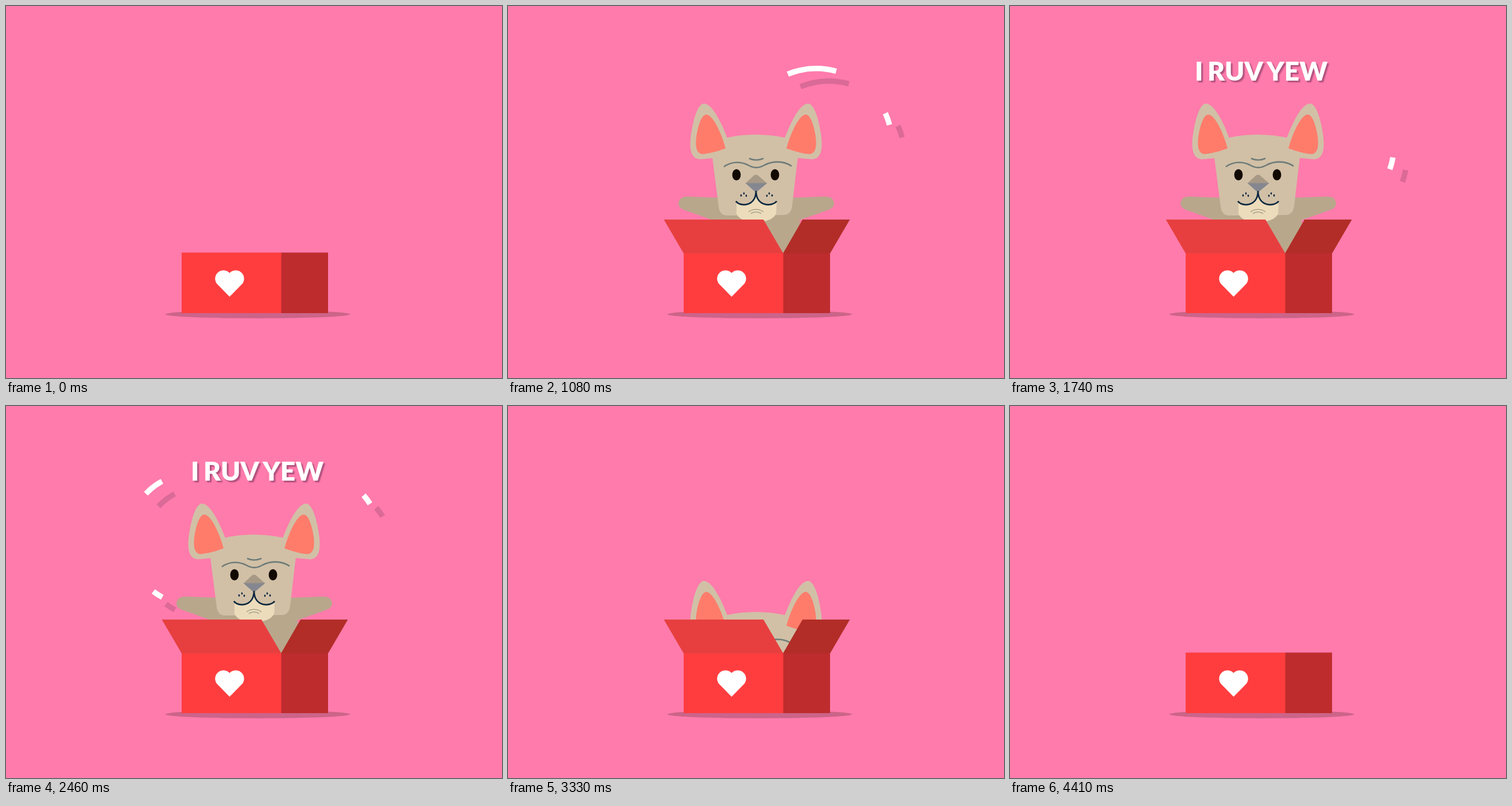
Write an HTML page that moves like this. It is 864 px wide and 648 px high and loops after 4.89 s.

```html
<!DOCTYPE html>
<html lang="en">
<head>
<meta charset="utf-8">
<title>Dog in a box</title>
<style>
  html, body { margin: 0; width: 100%; height: 100%; overflow: hidden; background: #ff7bab; }
  svg { display: block; width: 100vw; height: 100vh; }
  .words text {
    font: 900 46px Lato, "Open Sans", sans-serif;
    fill: #fff;
    text-shadow: 3px 3px 2px rgba(60, 20, 60, .4);
  }
  .swoosh path { fill: none; stroke-width: 9.5; }
</style>
</head>
<body>
<svg viewBox="0 0 864 648">
  <defs>
    <clipPath id="floor"><rect width="864" height="528"/></clipPath>
    <g id="ear">
      <path fill="#d1c0a6" d="M341 170C353 170 367 191 382 230L390 262L357 265L335 267C319 267 316 250 318 230C321 205 329 171 341 170Z"/>
      <path fill="#ff7c6b" d="M345 189C357 189 372 222 379 248Q358 256 340 258C328 258 326 245 328 228C331 208 337 190 345 189Z"/>
    </g>
    <path id="arm" fill="#b9a78c" d="M465 335L552 332Q568 332 568 345Q568 352 556 356L508 373L460 388Z"/>
    <g id="dots" fill="#0d2840">
      <ellipse cx="406" cy="330" rx="1.4" ry="2"/>
      <ellipse cx="411" cy="326.5" rx="1.3" ry="2"/>
      <ellipse cx="415" cy="330.5" rx="1.3" ry="2"/>
    </g>
  </defs>

  <rect width="864" height="648" fill="#ff7bab"/>
  <ellipse cx="438.5" cy="537" rx="161" ry="7" fill="#cc6489"/>
  <g class="swoosh" id="swoosh"></g>

  <g clip-path="url(#floor)">
    <g id="dog">
      <use href="#arm" id="armR"/>
      <g transform="matrix(-1 0 0 1 865 0)"><use href="#arm" id="armL"/></g>
      <path fill="#b9a78c" d="M385 340H480L502 366Q512 372 508 400L504 480H360L356 372Z"/>
      <path fill="#d1c0a6" d="M378 230Q430 218 486 230L505 262L495 348Q493 364 480 364L384 365Q369 366 367 350L356 264Z"/>
      <use href="#ear"/>
      <use href="#ear" transform="matrix(-1 0 0 1 864 0)"/>
      <g fill="none" stroke="#6f7c79" stroke-width="2.6">
        <path d="M376 280C390 270 406 271 418 277C428 283 437 283 447 277C460 270 480 269 494 279"/>
        <path d="M420 265.5Q432 271 445 265.5"/>
      </g>
      <ellipse cx="398" cy="294" rx="7.4" ry="9.8" fill="#120900"/>
      <ellipse cx="465" cy="294" rx="7.4" ry="9.8" fill="#120900"/>
      <path fill="#ecdcbb" d="M398 342C408 350 430 348 432 324C434 348 456 350 468 342L467 362Q460 376 432 376Q404 376 398 362Z"/>
      <path fill="#a79986" d="M413.5 309L428 295.5Q432 292 436 295.5L451.500 309Z"/>
      <path fill="#858790" d="M413.500 308.500H451.500L436 321.500Q432 325 428 321.500Z"/>
      <path fill="none" stroke="#0d2840" stroke-width="2.8" d="M397 340C404 350 432 350 432 322C432 350 460 350 468 340"/>
      <use href="#dots"/>
      <use href="#dots" transform="matrix(-1 0 0 1 866 0)"/>
      <g fill="none" stroke="#8e8a77" stroke-width="1.100">
        <path d="M419 358.500Q432 350 445 358.500"/>
        <path d="M423 361.500Q432 356 441 361.500"/>
      </g>
    </g>
  </g>

  <g id="box">
    <path id="flapFront" fill="#e73f3f"/>
    <path id="flapSide" fill="#b22d27"/>
    <rect x="306" y="429.500" width="174" height="105.500" fill="#ff3d3f" id="front"/>
    <rect x="479.500" y="429.500" width="81.500" height="105.500" fill="#be2c2e" id="side"/>
    <path fill="#fff" d="M389.500 506.500L367 483.500A14.600 14.600 0 0 1 389.500 465A14.600 14.600 0 0 1 412 483.500Z"/>
  </g>

  <g class="words" id="words">
    <text x="322" y="129.500">I</text>
    <text x="344" y="129.500">RUV</text>
    <text x="447" y="129.500">YEW</text>
  </g>
</svg>

<script>
const LOOP = 4890;
const $ = id => document.getElementById(id);
const part = (t, from, dur) => Math.min(1, Math.max(0, (t - from) / dur));
const quadIn = p => p * p;
const quadOut = p => 1 - (1 - p) ** 2;
const backOut = p => 1 - (2.7 * (1 - p) ** 3 - 1.7 * (1 - p) ** 2);

function bounceOut(p) {
  const k = 7.5625, d = 2.75;
  if (p < 1 / d) return k * p * p;
  if (p < 2 / d) return k * (p - 1.5 / d) ** 2 + .75;
  if (p < 2.5 / d) return k * (p - 2.25 / d) ** 2 + .9375;
  return k * (p - 2.625 / d) ** 2 + .984375;
}

const setY = (el, y) => el.setAttribute("transform", `translate(0 ${y.toFixed(2)})`);

// Streaks: start time, side (1 right, -1 left), radius, centre height
const STREAK_MS = 600;
const streaks = [
  [714, 1, 132, 241], [930, 1, 132, 241], [1115, -1, 132, 241], [1274, 1, 132, 241],
  [1850, 1, 115, 232], [1870, -1, 115, 232], [2145, 1, 115, 232], [2190, -1, 115, 232]
].map(([start, side, r, cy]) => {
  const add = (stroke, shift) => {
    const el = document.createElementNS("http://www.w3.org/2000/svg", "path");
    el.setAttribute("stroke", stroke);
    el.setAttribute("transform", `translate(${shift} ${shift})`);
    return $("swoosh").appendChild(el);
  };
  return { start, side, r, cy, els: [add("rgba(30,20,50,.16)", 22), add("#fff", 0)] };
});

function drawStreak({ start, side, r, cy, els }, t) {
  const c = (t - start) / STREAK_MS;
  let d = "";
  if (c > 0 && c < 1) {
    const mid = -145 + 205 * c;
    const half = (9.3 + 28 * Math.max(0, Math.sin(2 * Math.PI * c))) / 2;
    const point = deg => {
      const a = deg * Math.PI / 180;
      return `${(432 + side * (105 + r * Math.cos(a))).toFixed(2)} ${(cy + r * Math.sin(a)).toFixed(2)}`;
    };
    d = `M${point(Math.max(-145, mid - half))}A${r} ${r} 0 0 ${side > 0 ? 1 : 0} ${point(mid + half)}`;
  }
  els.forEach(el => el.setAttribute("d", d));
}

const waves = { armR: [600, 815, 1160, 1750, 2040], armL: [1130, 1760, 2080] };

function drawDog(t) {
  const up = quadOut(part(t, 60, 431));
  const down = quadIn(part(t, 3150, 270));
  const shown = t > 60 && t < 3420;
  $("dog").style.display = shown ? "" : "none";
  setY($("dog"), 270 * (1 - up) + 300 * down);
  const lift = -100 * (1 - up) - 100 * quadIn(part(t, 3090, 195));
  for (const id in waves) {
    const wave = waves[id].reduce((sum, s) => sum + Math.sin(Math.PI * part(t, s, 200)), 0);
    $(id).setAttribute("transform", `rotate(${(lift - 20 * wave).toFixed(2)} 460 367)`);
  }
}

function drawBox(t) {
  const open = quadOut(part(t, 60, 150)) - quadIn(part(t, 3390, 150));
  const y = 431 - 59 * open, dx = 34.5 * open;
  $("flapFront").setAttribute("d", open > 0 ? `M306 431H479.500L${479.5 - dx} ${y}H${306 - dx}Z` : "");
  $("flapSide").setAttribute("d", open > 0 ? `M479 431H561L${561 + dx} ${y}H${478.5 + dx}Z` : "");
  const top = 429.5 + 1.5 * Math.min(1, open * 4);
  for (const id of ["front", "side"]) {
    $(id).setAttribute("y", top);
    $(id).setAttribute("height", 535 - top);
  }
  const rise = t < 3840 ? quadOut(part(t, 3680, 160)) : 1 - bounceOut(part(t, 3840, 570));
  setY($("box"), -34 * rise);
}

function drawWords(t) {
  [...$("words").children].forEach((word, i) => {
    const enter = 970 * (1 - backOut(part(t, 1190 + 30 * i, 480)));
    const leave = 600 * quadIn(part(t, 3090 + 30 * i, 150));
    setY(word, enter - leave);
  });
}

function draw() {
  const t = performance.now() % LOOP;
  drawBox(t);
  drawDog(t);
  streaks.forEach(s => drawStreak(s, t));
  drawWords(t);
  requestAnimationFrame(draw);
}
draw();
</script>
</body>
</html>
```
